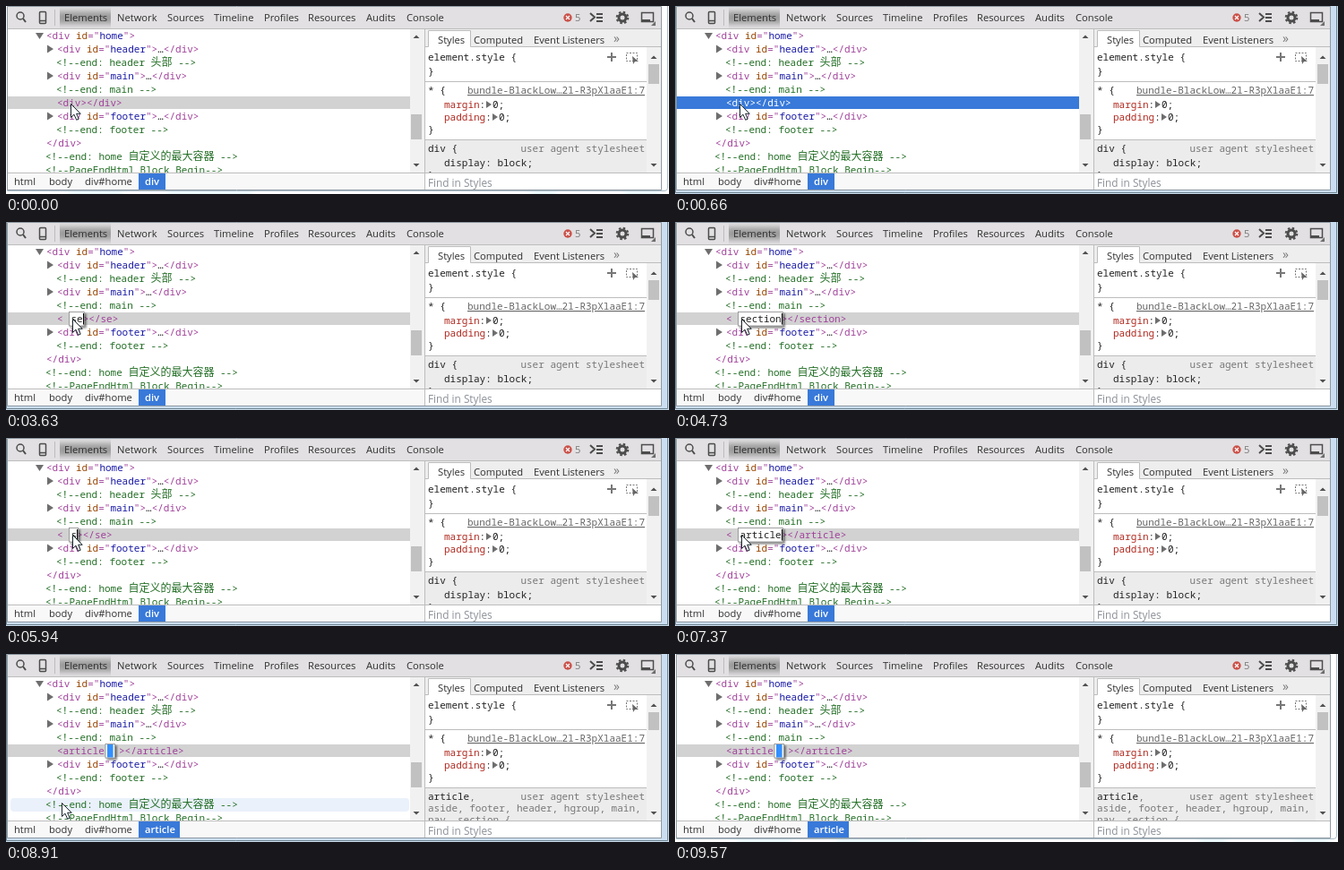
Write an HTML page that moves like this. It is 740 px wide and 210 px high and loops after 9680 ms.

```html
<!DOCTYPE html>
<html lang="en">
<head>
<meta charset="utf-8">
<title>Editing a tag name</title>
<style>
  html, body { margin: 0; width: 100%; height: 100%; overflow: hidden; background: #fff; }
  svg { display: block; width: 740px; height: 210px; }
  text { white-space: pre; font: 11.2px "Open Sans", sans-serif; fill: #303030; }
  .code, .code text { font: 11px "Noto Sans Mono", "Noto Sans CJK SC", monospace; fill: #222; }
  .code .tag { fill: #a0409a; }
  .code .attr { fill: #994500; }
  .code .value { fill: #1a1aa6; }
  .code .comment { fill: #236e25; }
  .cjk { font-size: 12px; }
  .code .prop { fill: #b02a20; }
  .code .dim { fill: #777; }
  .code .link { fill: #666; text-decoration: underline; }
  .end { text-anchor: end; }
  .code .white, .white { fill: #fff; }
  #crumb { font-weight: 600; }
  .arrow { fill: #6e6e6e; }
  .line { fill: none; stroke: #4c4c4c; stroke-width: 1.5; }
  .rule { fill: none; stroke: #bdbdbd; }
</style>
</head>
<body>
<svg viewBox="0 0 740 210" xmlns="http://www.w3.org/2000/svg">
  <defs>
    <filter id="soft" x="-30%" y="-60%" width="160%" height="220%"><feGaussianBlur stdDeviation="3"/></filter>
    <filter id="shadow" x="-20%" y="-20%" width="160%" height="160%"><feDropShadow dx="2" dy="2" stdDeviation="1.2" flood-color="#000" flood-opacity=".5"/></filter>
    <clipPath id="tabClip"><path d="M60 1H117V25H60Z"/></clipPath>
    <clipPath id="treeClip"><path d="M2 26H467V186H2Z"/></clipPath>
    <clipPath id="styleClip"><path d="M468 46H716V186H468Z"/></clipPath>
  </defs>

  <!-- window frame -->
  <g id="idleFrame">
    <path fill="#fff" d="M0 0H740V210H0Z"/>
    <g fill="#c9eef5" filter="url(#soft)">
      <path d="M70 208H130V211H70Z"/><path d="M180 208H275V211H180Z"/>
      <path d="M585 208H615V211H585Z"/><path d="M690 208H730V211H690Z"/>
    </g>
    <path fill="none" stroke="#a9bcc6" d="M1.5 0V206.5H735Q738.5 206.5 738.5 203V0"/>
  </g>
  <g id="activeFrame">
    <path fill="#cbdef1" d="M0 0H740V210H0Z"/>
    <path fill="none" stroke="#6f8792" d="M.5 0V208.5H738.5V0"/>
  </g>
  <path fill="#fff" d="M2 1H731V205H2Z"/>

  <!-- toolbar -->
  <path fill="#e2e0e2" d="M2 1H731V25H2Z"/>
  <path class="rule" d="M2 25.5H731M54.5 4V22"/>
  <g clip-path="url(#tabClip)"><path fill="#9c9c9c" filter="url(#soft)" d="M55 6H122V20H55Z"/></g>
  <g id="tabs"></g>
  <g class="line">
    <circle cx="16" cy="11" r="4"/><path stroke-width="2" d="M19 14L22 18"/>
    <rect x="37.5" y="6.5" width="7" height="13" rx="1"/><path d="M38 16.5H44"/>
    <path stroke-width="2" d="M652 8L657 12.5L652 17M659 9H666M659 13H666M659 17H666"/>
    <circle cx="688" cy="13" r="4" stroke-width="3"/>
    <circle cx="688" cy="13" r="6.3" stroke-width="2" stroke-dasharray="2.5 2.45"/>
    <rect x="709.5" y="7.5" width="13" height="10"/><path stroke-width="3" d="M710 16.5H719"/>
  </g>
  <path class="arrow" d="M720 22L725 17V22Z"/>
  <circle cx="627" cy="13" r="4.7" fill="#cb5048"/>
  <path stroke="#fff" stroke-width="1.3" d="M625 11L629 15M629 11L625 15"/>
  <text x="635" y="17" style="fill:#777">5</text>

  <!-- element tree -->
  <g class="code" clip-path="url(#treeClip)">
    <rect id="hover" x="5" width="445" height="15" rx="4" fill="#3879d9" opacity=".1"/>
    <rect id="rowFill" x="2" y="101" width="449" height="14"/>
    <path class="arrow" d="M33 30H42L37.5 37Z"/>
    <path class="arrow" d="M46 43.5V52.5L53 48ZM46 73.5V82.5L53 78ZM46 118.5V127.5L53 123Z"/>
    <g id="tree"></g>
    <text id="opening" x="57" y="112" class="tag"></text>
    <text id="closing" y="112" class="tag"></text>
    <g id="editor">
      <rect id="box" y="100.5" height="15.5" fill="#fff" stroke="#888" stroke-width=".8" filter="url(#shadow)"/>
      <rect id="selection" y="101" height="14.5" fill="#3390ff"/>
      <text id="typed" x="72.5" y="112"></text>
      <path id="caret" stroke="#000" d="M0 102V114.5"/>
    </g>
  </g>
  <path fill="#f1f1f1" d="M451 26H467V186H451Z"/>
  <path fill="#c1c1c1" d="M452 121H464V149H452Z"/>
  <path fill="#505050" d="M454.5 36L458 32.5L461.5 36ZM454.5 176L458 179.5L461.5 176Z"/>

  <!-- styles -->
  <path fill="#eee" d="M468 26H731V45H468Z"/>
  <path fill="#fff" d="M471 27H518V46H471Z"/>
  <path class="rule" d="M467.5 26V205M468 45.5H471.5V27.5H518.5V45.5H731"/>
  <text x="482" y="42">Styles</text>
  <text x="522" y="42">Computed</text>
  <text x="589" y="42">Event Listeners</text>
  <text x="678" y="41" style="font-size:14px;fill:#777">»</text>
  <g class="code" clip-path="url(#styleClip)">
    <path fill="#ececec" d="M468 150H716V186H468Z"/>
    <path class="rule" d="M468 84.5H716M468 149.5H716"/>
    <text x="471" y="61">element.style {</text>
    <text x="471" y="77">}</text>
    <text x="471" y="98">* {</text>
    <text x="713" y="98" class="link end">bundle-BlackLow…2l-R3pXlaaE1:7</text>
    <text x="489" y="114"><tspan class="prop">margin</tspan>:</text>
    <text x="543" y="114">0;</text>
    <text x="489" y="128"><tspan class="prop">padding</tspan>:</text>
    <text x="550" y="128">0;</text>
    <path class="arrow" d="M536 106V114L542 110ZM543 120V128L549 124Z"/>
    <text x="471" y="142">}</text>
    <text x="713" y="163" class="dim end">user agent stylesheet</text>
    <g id="divRule">
      <text x="471" y="163">div {</text>
      <text x="489" y="179">display: block;</text>
      <text x="471" y="193">}</text>
    </g>
    <g id="articleRule">
      <text x="471" y="163">article<tspan class="dim">,</tspan></text>
      <text x="471" y="176" class="dim">aside, footer, header, hgroup, main,</text>
      <text x="471" y="189" class="dim">nav, section {</text>
    </g>
    <path stroke="#777" stroke-width="2" d="M671 57H681M676 52V62"/>
    <rect x="692.5" y="52.5" width="12" height="9" fill="none" stroke="#777" stroke-dasharray="2 1.5"/>
    <path fill="#666" d="M699 56L706 62H702L700 65Z"/>
  </g>
  <path fill="#f1f1f1" d="M715 46H731V186H715Z"/>
  <rect id="thumb" x="717" y="65" width="12" fill="#c1c1c1"/>
  <path fill="#505050" d="M719.5 59L723 55.5L726.5 59ZM719.5 176L723 179.5L726.5 176Z"/>

  <!-- breadcrumbs and search -->
  <path fill="#f8f8f8" d="M2 187H467V205H2Z"/>
  <path class="rule" d="M2 186.5H731M467.5 186V205"/>
  <path fill="none" stroke="#8f9aa3" d="M1.5 .5H731.5V205.5H1.5Z"/>
  <text x="9" y="200">html</text>
  <text x="48" y="200">body</text>
  <text x="88" y="200">div#home</text>
  <rect id="crumbFill" x="148" y="187" height="18" fill="#3879d9"/>
  <text id="crumb" class="white" x="155" y="200"></text>
  <text x="471" y="202" style="font-size:11.8px;fill:#8a8f96">Find in Styles</text>

  <path id="pointer" fill="#fff" stroke="#17252b" d="M.5 .5V15.5L4 12.2L6.7 18.3L9.2 17.2L6.6 11.3H11.2Z"/>
</svg>
<script>
const LOOP = 9680, CHAR = 6.6, TEXT_X = 72.5, STEP = 110;
const $ = id => document.getElementById(id);
const set = (id, attrs) => { for (const k in attrs) $(id).setAttribute(k, attrs[k]); };
const show = (id, on) => { $(id).style.display = on ? '' : 'none'; };
const span = (cls, s) => `<tspan class="${cls}">${s}</tspan>`;

const tabs = { Elements: 65, Network: 124, Sources: 180, Timeline: 232, Profiles: 288,
  Resources: 337, Audits: 402, Console: 447 };
$('tabs').innerHTML = Object.entries(tabs).map(([name, x]) => `<text x="${x}" y="17">${name}</text>`).join('');

const openDiv = id => span('tag', '&lt;div ') + span('attr', 'id') + span('tag', '="') +
  span('value', id) + span('tag', '"&gt;');
const folded = id => openDiv(id) + '…' + span('tag', '&lt;/div&gt;');
const comment = s => span('comment', `&lt;!--${s}--&gt;`);
const rows = [
  [45, openDiv('home')],
  [57, folded('header')],
  [56, comment('end: header <tspan class="cjk">头部</tspan> ')],
  [57, folded('main')],
  [56, comment('end: main ')],
  [57, ''],
  [57, folded('footer')],
  [56, comment('end: footer ')],
  [45, span('tag', '&lt;/div&gt;')],
  [44, comment('end: home <tspan class="cjk">自定义的最大容器</tspan> ')],
  [44, comment('PageEndHtml Block Begin')],
];
$('tree').innerHTML = rows.map(([x, s], i) => `<text x="${x}" y="${37 + 15 * i}">${s}</text>`).join('');

// Each entry: start time, typed text, closing tag name when it lags behind.
const typing = (start, word, from, to) => {
  const dir = Math.sign(to - from), list = [];
  for (let n = from, t = start; n !== to + dir; n += dir, t += STEP) list.push([t, word.slice(0, n)]);
  return list;
};
const edits = [
  [880, 'div'],
  ...typing(1650, 'img', 2, 3),
  ...typing(2970, 'img', 2, 0),
  ...typing(3520, 'se', 1, 2),
  ...typing(3850, 'section', 3, 7),
  ...typing(5280, 'section', 6, 2),
  [5940, 's', 'se'], [6050, 's'], [6160, ''],
  ...typing(6710, 'article', 1, 7),
];
const moves = [[0, 72, 109], [1210, 74, 108], [8690, 78, 95], [8800, 73, 119], [8910, 62, 166], [9020, 40, 220]];
const at = (list, t) => list.findLast(item => item[0] <= t);

function draw(t) {
  const active = t >= 660 && t < 9570;
  const renamed = t >= 7700, attribute = t >= 7810;
  const naming = t >= 880 && !renamed;
  const focused = (t >= 660 && t < 880) || (renamed && !attribute);
  show('activeFrame', active);
  show('idleFrame', !active);
  $('rowFill').setAttribute('fill', focused ? '#3879d9' : '#d2d2d2');

  const name = renamed ? 'article' : 'div';
  const [, word, lag] = naming ? at(edits, t) : [0, name];
  const end = TEXT_X + word.length * CHAR;
  $('opening').textContent = naming ? '<' : '<' + name;
  $('closing').textContent = `></${lag ?? word}>`;
  const tail = naming ? end : attribute ? 126 : 57 + (name.length + 1) * CHAR;
  $('closing').setAttribute('x', tail);
  for (const id of ['opening', 'closing']) $(id).classList.toggle('white', focused);

  const selected = naming && t < 1650;
  show('editor', naming || attribute);
  show('selection', selected || attribute);
  show('caret', naming && !selected);
  $('typed').textContent = naming ? word : '';
  $('typed').classList.toggle('white', selected);
  set('box', attribute ? { x: 111, width: 10.5 } : { x: 70.5, width: end + 1.5 - 70.5 });
  set('selection', attribute ? { x: 113, width: 6.6 } : { x: TEXT_X, width: end - TEXT_X });
  set('caret', { transform: `translate(${Math.round(end) + .5} 0)` });

  $('crumb').textContent = name;
  set('crumbFill', { width: renamed ? 46 : 30 });
  show('divRule', !attribute);
  show('articleRule', attribute);
  set('thumb', { height: attribute ? 20 : 22 });

  const [, px, py] = at(moves, t);
  set('pointer', { transform: `translate(${px} ${py})` });
  show('hover', t >= 8690 && t < 9020);
  set('hover', { y: 26 + 15 * Math.floor((py - 26) / 15) });
}

const start = performance.now();
function tick() {
  draw((performance.now() - start) % LOOP);
  requestAnimationFrame(tick);
}
tick();
</script>
</body>
</html>
```
